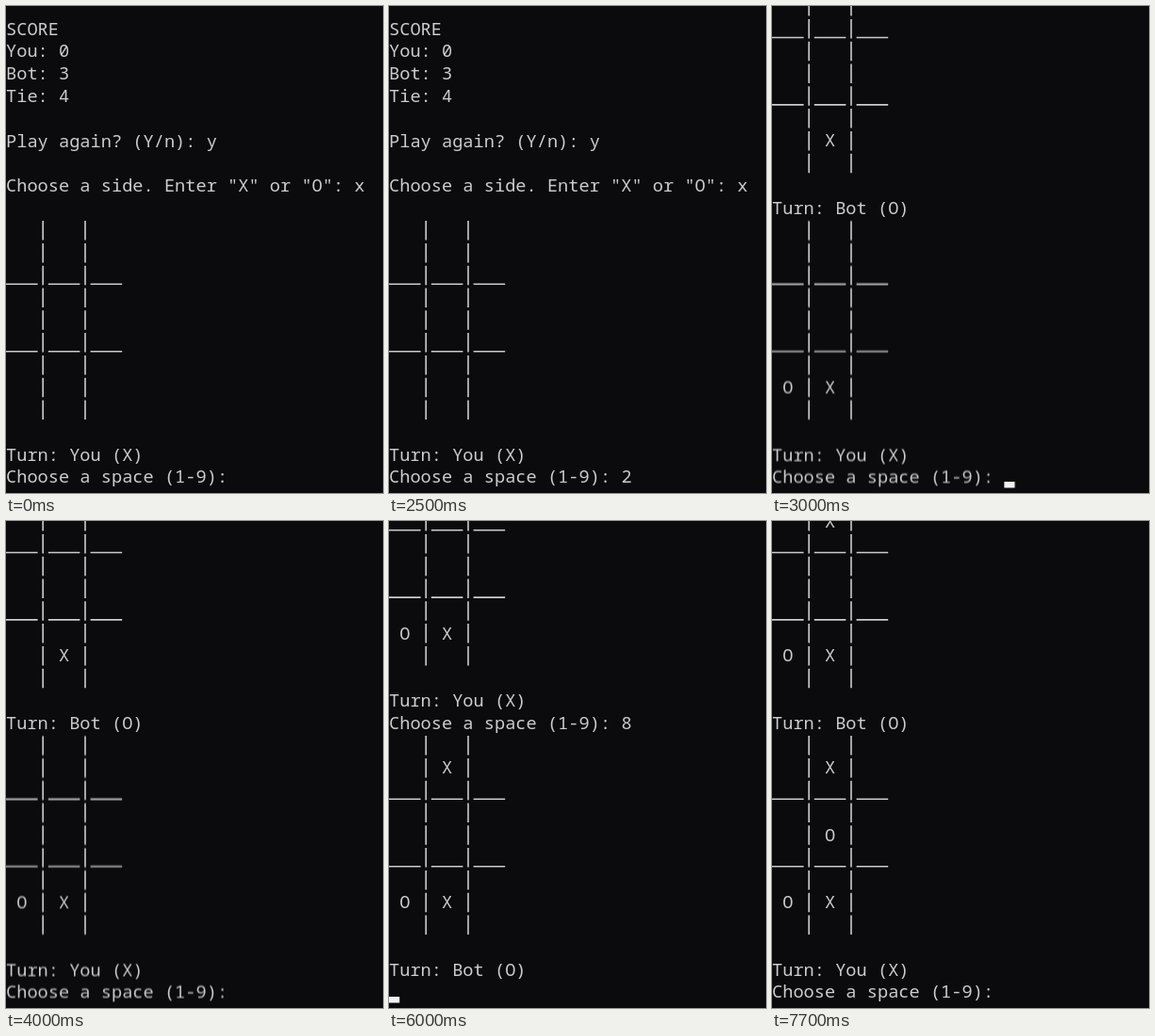
These frames come from a looping animation (400x517 px, 8 s). An HTML page:

```html
<!DOCTYPE html>
<html lang="en">
<head>
<meta charset="utf-8">
<title>Tic-tac-toe in a terminal</title>
<style>
  html, body {
    margin: 0;
    width: 100%;
    height: 100%;
    overflow: hidden;
    background: #0b0a0d;
  }
  svg {
    display: block;
    width: 400px;
    height: 517px;
  }
  text {
    font: 18.667px "Noto Sans Mono", "DejaVu Sans Mono", monospace;
    fill: #ccc;
  }
  .mark { text-anchor: middle; }
  #board path {
    fill: none;
    stroke: #ccc;
    stroke-width: 1.6;
  }
  #board .pipes { stroke-dasharray: 20.5 3.3; }

  /* Every animation shares one 8 s clock with hard cuts. */
  .log, .step, .cursor { animation: 8s step-end infinite; }
  .log { animation-name: scroll; }
  .cursor { animation-name: cursor; fill: #f2f2f2; }
  .key-a { animation-name: key-a; }
  .move-a { animation-name: move-a; }
  .reply-a { animation-name: reply-a; }
  .key-b { animation-name: key-b; }
  .move-b { animation-name: move-b; }
  .reply-b { animation-name: reply-b; }

  @keyframes key-a { 0% { opacity: 0 } 28.75%, 100% { opacity: 1 } }
  @keyframes move-a { 0% { opacity: 0 } 35%, 100% { opacity: 1 } }
  @keyframes reply-a { 0% { opacity: 0 } 37.5%, 100% { opacity: 1 } }
  @keyframes key-b { 0% { opacity: 0 } 66.25%, 100% { opacity: 1 } }
  @keyframes move-b { 0% { opacity: 0 } 75%, 100% { opacity: 1 } }
  @keyframes reply-b { 0% { opacity: 0 } 76.25%, 100% { opacity: 1 } }

  /* 12 lines up after a move, 11 after the reply; a line is 23.8px. */
  @keyframes scroll {
    0% { transform: translateY(0) }
    35% { transform: translateY(-285.6px) }
    37.5% { transform: translateY(-547.4px) }
    75% { transform: translateY(-833px) }
    76.25%, 100% { transform: translateY(-1094.8px) }
  }

  @keyframes cursor {
    0% { transform: translateX(246.4px); opacity: 0 }
    17.5% { opacity: 1 }
    23.75% { opacity: 0 }
    28.75% { transform: translateX(257.6px); opacity: 1 }
    31.25% { opacity: 0 }
    35% { transform: translateX(0); opacity: 1 }
    37.5% { transform: translateX(246.4px); opacity: 1 }
    50% { opacity: 0 }
    57.5% { opacity: 1 }
    63.75% { opacity: 0 }
    66.25% { transform: translateX(257.6px); opacity: 1 }
    70% { opacity: 0 }
    75% { transform: translateX(0); opacity: 1 }
    76.25% { transform: translateX(246.4px); opacity: 1 }
    83.75% { opacity: 0 }
    90% { opacity: 1 }
    96.25%, 100% { transform: translateX(246.4px); opacity: 0 }
  }
</style>
</head>
<body>
<svg viewBox="0 0 400 517">
  <defs>
    <g id="board">
      <path class="pipes" d="M39.2 13.9v210.9"/>
      <path class="pipes" d="M84 13.9v210.9"/>
      <path d="M0 81.1h33.6m11.2 0h33.6m11.2 0h33.6M0 152.5h33.6m11.2 0h33.6m11.2 0h33.6"/>
    </g>
  </defs>

  <g class="log">
    <text y="30.5">
      <tspan x="0">SCORE</tspan>
      <tspan x="0" dy="23.8">You: 0</tspan>
      <tspan x="0" dy="23.8">Bot: 3</tspan>
      <tspan x="0" dy="23.8">Tie: 4</tspan>
      <tspan x="0" dy="47.6">Play again? (Y/n): y</tspan>
      <tspan x="0" dy="47.6">Choose a side. Enter "X" or "O": x</tspan>
    </text>

    <g transform="translate(0 214.2)">
      <use href="#board"/>
      <text x="0" y="268.5">Turn: You (X)</text>
      <text x="0" y="292.3">Choose a space (1-9):</text>
      <text class="step key-a" x="246.4" y="292.3">2</text>
    </g>

    <g class="step move-a">
      <g transform="translate(0 499.8)">
        <use href="#board"/>
        <text class="mark" x="61.6" y="197.1">X</text>
        <text x="0" y="268.5">Turn: Bot (O)</text>
      </g>
    </g>

    <g class="step reply-a">
      <g transform="translate(0 761.6)">
        <use href="#board"/>
        <text class="mark" x="16.8" y="197.1">O</text>
        <text class="mark" x="61.6" y="197.1">X</text>
        <text x="0" y="268.5">Turn: You (X)</text>
        <text x="0" y="292.3">Choose a space (1-9):</text>
        <text class="step key-b" x="246.4" y="292.3">8</text>
      </g>
    </g>

    <g class="step move-b">
      <g transform="translate(0 1047.2)">
        <use href="#board"/>
        <text class="mark" x="61.6" y="54.3">X</text>
        <text class="mark" x="16.8" y="197.1">O</text>
        <text class="mark" x="61.6" y="197.1">X</text>
        <text x="0" y="268.5">Turn: Bot (O)</text>
      </g>
    </g>

    <g class="step reply-b">
      <g transform="translate(0 1309)">
        <use href="#board"/>
        <text class="mark" x="61.6" y="54.3">X</text>
        <text class="mark" x="61.6" y="125.7">O</text>
        <text class="mark" x="16.8" y="197.1">O</text>
        <text class="mark" x="61.6" y="197.1">X</text>
        <text x="0" y="268.5">Turn: You (X)</text>
        <text x="0" y="292.3">Choose a space (1-9):</text>
      </g>
    </g>
  </g>

  <rect class="cursor" y="505" width="11.2" height="6.5"/>
</svg>
</body>
</html>
```
